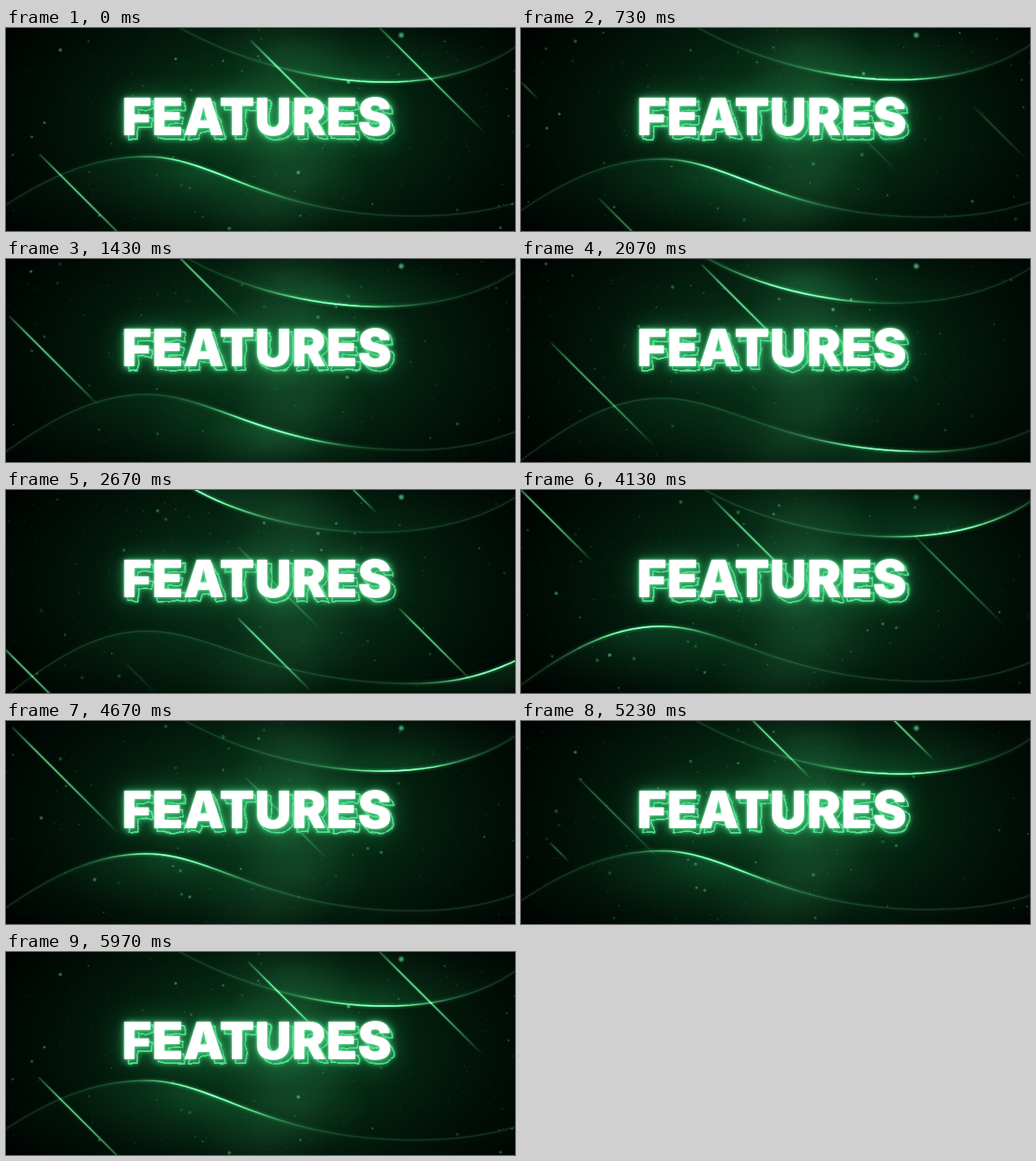
Write an HTML page with a canvas that moves like this. It is 640 px wide and 256 px high and loops after 6.01 s.

```html
<!DOCTYPE html>
<html lang="en">
<head>
<meta charset="utf-8">
<title>Features</title>
<style>
  html, body { margin: 0; width: 100%; height: 100%; overflow: hidden; background: #000; }
  canvas, svg { position: absolute; left: 0; top: 0; width: 640px; height: 256px; }
  text { font: 900 64px Inter, Roboto, sans-serif; letter-spacing: .4px; text-anchor: middle; stroke-linejoin: round; }
  .aura { fill: #2aa45c; filter: blur(17px); opacity: .75; }
  .halo { fill: #43d481; stroke: #43d481; stroke-width: 4; filter: blur(5px); opacity: .75; }
  .rim { fill: none; stroke: #52dc8c; stroke-width: 1.9; }
  .rimGlow { filter: drop-shadow(0 0 2px #2bb567); }
  .face { fill: #fff; filter: drop-shadow(0 0 1.5px #a4ffc6); }
</style>
</head>
<body>
<canvas id="stage" width="640" height="256"></canvas>
<svg viewBox="0 0 640 256">
  <defs>
    <filter id="wobble" filterUnits="userSpaceOnUse" x="90" y="40" width="460" height="150"
            color-interpolation-filters="sRGB">
      <feTurbulence type="fractalNoise" baseFrequency=".05" numOctaves="2" seed="7" result="noise"/>
      <feOffset id="drift" in="noise" result="moved"/>
      <feDisplacementMap in="SourceGraphic" in2="moved" scale="7"
                         xChannelSelector="R" yChannelSelector="G"/>
    </filter>
  </defs>
  <g aria-hidden="true">
    <text class="aura" x="317" y="137">FEATURES</text>
    <text class="halo" x="317" y="137">FEATURES</text>
    <g class="rimGlow"><g filter="url(#wobble)"><text class="rim" x="320" y="140">FEATURES</text></g></g>
  </g>
  <text class="face" x="315.5" y="135">FEATURES</text>
</svg>
<script>
const W = 640, H = 256, LOOP = 6010, TAU = Math.PI * 2;
const ctx = document.getElementById('stage').getContext('2d');
const drift = document.getElementById('drift');

const mix = (a, b, k) => a + (b - a) * k;
const rgba = (a, c) => `rgba(${c},${a})`;
const wrap = d => d - LOOP * Math.round(d / LOOP);

let seed = 41;
const rand = () => (seed = (seed * 16807) % 2147483647) / 2147483647;

// Control points of both waves; k runs from the low pose to the raised one.
const topWave = {
  points: k => [[mix(232, 212, k), -4], [330, mix(55, 65, k)], [530, mix(84, 105, k)], [645, mix(6, 21, k)]],
  light: 465, before: -16.5, after: -21, edge: -5
};
const lowWave = {
  points: k => {
    const crest = mix(178, 162, k), trough = mix(244, 237, k);
    return [
      [-5, mix(264, 226, k)], [57, mix(215, 185, k)], [112, crest], [177, crest],
      [262, crest], [330, trough], [512, trough],
      [570, trough], [610, 230], [645, mix(213, 219, k)]
    ];
  },
  light: 255, before: 23, after: 34, edge: H + 5
};

// Diagonal streaks: birth x, birth y, birth time
const RUN = 190, SPAN = 2200;
const streaks = [
  [0, 68, 600], [212, -8, 900],
  [493, 148, 2030], [290, 160, 2030], [-10, 192, 2030], [427, -10, 2430],
  [222, -8, 2900], [-10, -10, 3450],
  [284, -8, 4700], [450, -20, 4780], [36, 153, 5080]
];

// Many faint specks, a few large ones
const specks = Array.from({ length: 620 }, () => {
  const size = rand() ** 9;
  return {
    x: rand() * W, y: rand() * H, peak: rand() * LOOP, life: 900 + rand() * 900,
    r: .45 + 1.2 * size, a: .12 + .3 * rand() + .25 * size
  };
});

function glow(x, y, rx, ry, stops) {
  ctx.save();
  ctx.translate(x, y);
  ctx.scale(rx, ry);
  const g = ctx.createRadialGradient(0, 0, 0, 0, 0, 1);
  stops.forEach((color, i) => g.addColorStop(i / (stops.length - 1), color));
  ctx.fillStyle = g;
  ctx.fillRect(-1, -1, 2, 2);
  ctx.restore();
}

function background(swing) {
  ctx.globalCompositeOperation = 'source-over';
  ctx.fillStyle = '#000301';
  ctx.fillRect(0, 0, W, H);
  ctx.globalCompositeOperation = 'lighter';
  const lift = 6 * swing;
  glow(335, 122, 385, 235, [
    `rgb(9,${50 + lift},27)`, `rgb(7,${41 + lift},22)`, 'rgb(3,26,13)', 'rgb(1,11,5)', 'rgb(0,0,0)'
  ]);
  for (let i = 0; i < 6; i++) {
    glow(350 + 28 * Math.sin(i * 2.1), 25 + i * 42, 85, 60, [rgba(.13, '60,120,80'), rgba(0, '60,120,80')]);
  }
}

function sample(points) {
  const out = [points[0]];
  for (let i = 0; i + 3 < points.length; i += 3) {
    const [p, q, r, s] = points.slice(i, i + 4);
    for (let n = 1; n <= 30; n++) {
      const t = n / 30, u = 1 - t;
      out.push([0, 1].map(j =>
        u * u * u * p[j] + 3 * u * u * t * q[j] + 3 * u * t * t * r[j] + t * t * t * s[j]));
    }
  }
  return out;
}

function trace(path) {
  ctx.beginPath();
  path.forEach(p => ctx.lineTo(...p));
}

function lightAlong(x, base, peak, spread, color) {
  const g = ctx.createLinearGradient(0, 0, W, 0);
  for (let i = 0; i <= 64; i++) {
    const d = (i * 10 - x) / spread;
    g.addColorStop(i / 64, rgba(base + peak * Math.exp(-d * d), color));
  }
  return g;
}

function wave(w, swing, t) {
  const path = sample(w.points(swing));
  const u = wrap(t) / 1000;
  const x = w.light + Math.sign(u) * (u < 0 ? w.before : w.after) * Math.abs(u) ** 2.4;
  const y = (path.find(p => p[0] >= x) || path[path.length - 1])[1];

  ctx.save();
  trace([...path, [645, w.edge], [path[0][0], w.edge]]);
  ctx.clip();
  const body = '28,110,62';
  const flat = ctx.createLinearGradient(0, mix(y, H / 2, .5), 0, w.edge);
  flat.addColorStop(0, rgba(.09, body));
  flat.addColorStop(1, rgba(0, body));
  ctx.fillStyle = flat;
  ctx.fillRect(0, 0, W, H);
  glow(x, y, 170, 75, [rgba(.22, body), rgba(.07, body), rgba(0, body)]);
  ctx.restore();

  const stroke = (width, ...light) => {
    ctx.lineWidth = width;
    ctx.strokeStyle = lightAlong(x, ...light);
    ctx.stroke();
  };
  trace(path);
  stroke(8, .012, .1, 95, '60,190,105');
  stroke(3.6, .045, .3, 75, '70,205,120');
  stroke(1.4, .1, .75, 62, '160,250,185');
}

function streak([x, y, start], t) {
  const p = ((t - start + LOOP) % LOOP) / SPAN;
  if (p >= 1) return;
  const tail = RUN * p ** 4, head = RUN * (1 - (1 - p) ** 2);
  const fade = .9 * Math.min(1, p * 6, (1 - p) * 2.4);
  const line = (width, k, color) => {
    const g = ctx.createLinearGradient(x + tail, y + tail, x + head, y + head);
    [.25, .9, 1, .85, .5, 0].forEach((a, i) => g.addColorStop(i / 5, rgba(fade * k * a, color)));
    ctx.strokeStyle = g;
    ctx.lineWidth = width;
    trace([[x + tail, y + tail], [x + head, y + head]]);
    ctx.stroke();
  };
  line(5, .16, '60,200,110');
  line(2, .72, '125,235,160');
}

function dot(x, y, r, a) {
  ctx.fillStyle = rgba(a, '90,195,130');
  ctx.beginPath();
  ctx.arc(x, y, r, 0, TAU);
  ctx.fill();
}

function softDot(x, y, r, a) {
  dot(x, y, r * 1.7, a * .35);
  dot(x, y, r, a * .65);
}

function particles(t) {
  for (const s of specks) {
    const dt = wrap(t - s.peak), k = 1 - Math.abs(dt) / s.life;
    if (k > 0) softDot(s.x, s.y - dt * .015, s.r, s.a * Math.sqrt(k));
  }
  softDot(497, 9, 2.5, .65);
}

function draw(now) {
  const t = now % LOOP, turn = TAU * t / LOOP;
  const swing = (1 + Math.cos(TAU * (t + 150) / LOOP)) / 2;
  background(swing);
  wave(topWave, swing, t);
  wave(lowWave, swing, t);
  particles(t);
  streaks.forEach(s => streak(s, t));
  drift.setAttribute('dx', (20 * Math.cos(turn)).toFixed(2));
  drift.setAttribute('dy', (20 * Math.sin(turn)).toFixed(2));
}

const begin = performance.now();
function tick() {
  draw(performance.now() - begin);
  requestAnimationFrame(tick);
}
tick();
</script>
</body>
</html>
```
